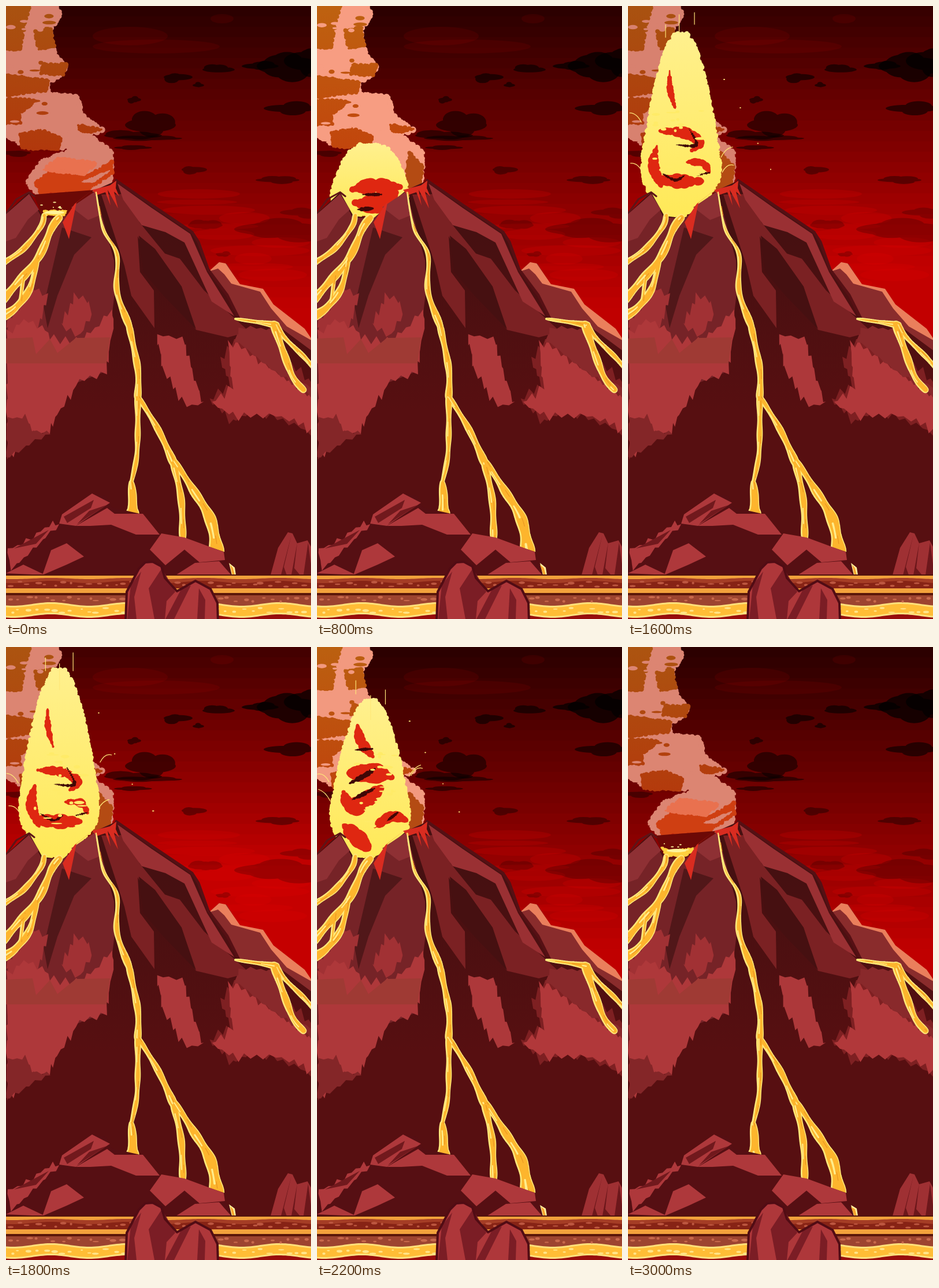
These frames come from a looping animation (528x1060 px, 3.2 s). An HTML page with a canvas:

```html
<!DOCTYPE html>
<html lang="en">
<head>
<meta charset="utf-8">
<title>Volcano</title>
<style>
html,body{margin:0;width:100%;height:100%;overflow:hidden;background:#2c0000}
canvas{display:block}
</style>
</head>
<body>
<canvas id="stage" width="528" height="1060"></canvas>
<script>
const c = document.getElementById('stage').getContext('2d');
const LIP = 362, { sin, cos, min, max, hypot, ceil, round } = Math;

function random(seed) {
  seed = seed * 48271 % 2147483647;
  return () => (seed = seed * 16807 % 2147483647) / 2147483647;
}
const mix = (a, b, k) => a + (b - a) * k;
const points = s => s.match(/\S+ \S+/g).map(p => p.split(' ').map(Number));

function poly(color, ...shapes) {
  c.fillStyle = color;
  for (const s of shapes) c.fill(new Path2D(`M${s}Z`));
}
function line(color, width, path) {
  c.strokeStyle = color; c.lineWidth = width; c.lineJoin = c.lineCap = 'round';
  c.stroke(new Path2D('M' + path));
}
function oval(color, x, y, rx, ry) {
  c.fillStyle = color;
  c.beginPath(); c.ellipse(x, y, rx, ry, 0, 0, 7); c.fill();
}
// splits each edge into steps of about the given length
function split(shape, step) {
  const p = points(shape);
  return p.flatMap(([x, y], i) => {
    const [x2, y2] = p[(i + 1) % p.length], k = max(1, ceil(hypot(x2 - x, y2 - y) / step));
    return Array.from({ length: k }, (_, s) => [mix(x, x2, s / k), mix(y, y2, s / k)]);
  });
}
// polygon with torn, spiky edges
function crag(color, shape, amp = 9) {
  const rnd = random(shape.length * 31);
  poly(color, split(shape, 11).map(([x, y], i) => [x + rnd() * 4, y + (i % 2 ? amp : -amp) * rnd()]).join(' '));
}
// polygon with a billowing rim
function puff(color, shape, r, seed) {
  const rnd = random(seed);
  poly(color, shape);
  c.beginPath();
  for (const [x, y] of split(shape, r)) {
    const q = r * (.35 + rnd() * .8);
    c.moveTo(x + q, y); c.arc(x, y, q, 0, 7);
  }
  c.fill();
}
// Catmull-Rom curve sampled at each pixel
function spline(s) {
  const p = points(s), at = i => p[max(0, min(p.length - 1, i))], out = [];
  for (let i = 0; i < p.length - 1; i++) {
    const m = ceil(hypot(at(i + 1)[0] - at(i)[0], at(i + 1)[1] - at(i)[1]));
    for (let n = 0; n < m; n++) {
      const t = n / m;
      out.push([0, 1].map(k => {
        const a = at(i - 1)[k], b = at(i)[k], d = at(i + 1)[k], e = at(i + 2)[k];
        return b + .5 * t * (d - a + t * (2 * a - 5 * b + 4 * d - e + t * (3 * (b - d) + e - a)));
      }));
    }
  }
  return out;
}
function ribbon(color, curve, width, dx = 0) {
  c.fillStyle = color;
  c.beginPath();
  curve.forEach(([x, y], i) => {
    const r = max(0, width(i, i / curve.length) / 2);
    if (r) { c.moveTo(x + dx + r, y); c.arc(x + dx, y, r, 0, 7); }
  });
  c.fill();
}

function cloud(alpha, x, y, w, h) {
  const rnd = random(x + y), color = `rgba(0,0,0,${alpha})`;
  c.fillStyle = color;
  c.beginPath();
  for (let i = 0; i < 4; i++) {
    const dx = i ? (rnd() - .5) * w : 0, dy = i ? (rnd() - .5) * h : 0, rx = i ? w * .5 : w;
    c.moveTo(x + dx + rx, y + dy);
    c.ellipse(x + dx, y + dy, rx, i ? h * .75 : h * .6, 0, 0, 7);
  }
  c.fill();
}

function sky(step) {
  const k = { 8: .45, 9: 1, 10: .5 }[step] || 0, rnd = random(8);
  for (let y = 0; y < 620; y += 18) {
    const red = min(mix(192, 197, k), mix(44 + y * .29, 68 + y * .345, k));
    c.fillStyle = `rgb(${round(red)},0,0)`;
    c.fillRect(0, y, 528, 19);
  }
  const haze = 'rgba(255,0,0,.07)';
  oval(haze, 215, 52, 65, 16); oval(haze, 260, 70, 110, 12); oval(haze, 374, 22, 20, 8);
  for (let y = 325; y < 490; y += 14) oval('rgba(225,0,0,.2)', 330 + rnd() * 170, y, 30 + rnd() * 60, 4 + rnd() * 7);
  cloud(.7, 492, 104, 58, 26); cloud(.7, 516, 95, 35, 26); cloud(.7, 440, 104, 32, 8);
  cloud(.58, 298, 123, 25, 9); cloud(.58, 368, 110, 28, 8); cloud(.58, 333, 137, 10, 5);
  cloud(.58, 492, 177, 46, 11); cloud(.5, 222, 162, 12, 6);
  cloud(.5, 250, 206, 44, 20); cloud(.5, 220, 224, 50, 9); cloud(.5, 245, 229, 60, 5); cloud(.5, 220, 245, 33, 4);
  cloud(.38, 326, 283, 22, 8); cloud(.38, 470, 301, 38, 6); cloud(.38, 15, 254, 28, 6);
  cloud(.2, 345, 379, 30, 10); cloud(.2, 475, 386, 80, 19); cloud(.2, 376, 429, 13, 4); cloud(.2, 510, 357, 36, 9);
}

const BROWN = ['-12 -10 42 -9 30 38 24 72 -12 75', '50 43 76 40 82 68 56 74', '62 101 103 102 98 119 60 117',
  '-12 120 74 131 68 148 -12 156', '-12 160 52 165 22 187 26 203 -12 203', '126 206 166 213 130 220', '25 221 60 213 95 228 90 246 28 244'];

function smoke(step) {
  const k = .6 - .4 * cos(step * Math.PI / 4), a = step % 8 * Math.PI / 4, rnd = random(77);
  const pink = `rgb(${round(mix(208, 247, k))},${round(mix(122, 157, k))},${round(mix(106, 130, k))})`;
  const brown = c.createLinearGradient(0, 0, 0, 260);
  brown.addColorStop(0, `rgb(${round(mix(164, 190, k))},${round(mix(78, 98, k))},16)`);
  brown.addColorStop(1, `rgb(${round(mix(174, 194, k))},${round(mix(52, 68, k))},12)`);
  puff(pink, '-12 -10 82 -10 95 14 76 42 84 85 103 105 98 118 73 132 74 150 125 158 130 188 166 214 98 246 22 238 -12 213', 5, 11);
  BROWN.forEach((s, i) => {
    c.save();
    c.translate(sin(a + i), 1.5 * cos(a + i));
    puff(brown, s, 4, 30 + i);
    c.restore();
  });
  for (let i = 0; i < 26; i++) {
    oval(i % 3 ? brown : pink, rnd() * 75, rnd() * 225 + 2 * sin(a + i), 3 + rnd() * 9, 1 + rnd() * 3);
  }
  puff(pink, '100 215 148 226 184 254 180 312 60 330 36 307 62 267 110 252', 5, 5);
  if (step > 2 && step < 14) return puff('#b44b13', '160 254 183 278 176 314 152 320', 4, 15);
  puff('#cf3f12', '52 306 84 280 135 298 183 270 184 288 125 330 104 350 70 350', 4, 15);
  puff('#e9714f', '65 283 90 264 156 272 134 290', 4, 24);
  puff('#b9230d', '72 326 121 324 100 341 73 338', 3, 12);
  puff(pink, '132 304 179 285 151 304', 2, 35);
}

// each vein: width, then its course
const DOME = { top: 238, red: [[22, '58 318 95 311 145 313'], [26, '64 340 100 342 138 322']],
  dark: [[5, '78 326 112 326'], [6, '70 352 98 350']] };
const BURST = { top: 168,
  red: [[8, '75 261 124 263'], [15, '52 312 68 322 92 325'], [21, '88 281 140 283 146 306'], [16, '78 338 110 325 130 308']],
  dark: [[10, '82 323 104 318 119 306'], [11, '113 300 128 282 142 300'], [6, '94 287 118 281']] };
const PLUME = { top: 42,
  red: [[9, '72 112 73 145 82 178'], [16, '55 216 100 220 125 237 110 250'], [15, '50 242 44 275 58 313'],
    [12, '102 270 130 272 142 290'], [20, '50 300 90 303 130 303']],
  dark: [[5, '84 240 118 240 105 211'], [5, '60 290 82 301 98 293'], [4, '120 293 141 288']] };
const ROLL = { top: 88,
  red: [[15, '70 135 76 163 97 190'], [27, '55 218 107 219 131 226'], [24, '46 251 62 278 112 243'],
    [24, '46 308 66 326 90 350'], [18, '100 311 129 293 156 300']],
  dark: [[8, '56 236 83 222 101 210'], [6, '61 264 101 244'], [5, '121 301 140 286'], [5, '66 178 97 176']] };
const POSES = [, , , DOME, DOME, BURST, BURST, PLUME, PLUME, PLUME, ROLL, ROLL, ROLL, ROLL];
const TOPS = [, , , 283, 238, 207, 168, 90, 42, 35, 55, 88, 155, 235];

function flame(step) {
  poly('#6c0906', '48 326 153 318 99 368 63 365');
  const pose = POSES[step], top = TOPS[step], rnd = random(step + 60);
  if (!pose) {
    const last = step === 15;
    puff('#ffcf3f', last ? '58 347 75 353 117 348 101 360 68 361' : '66 355 105 354 100 361 68 361', 2.5, step + 2);
    oval('#fff39a', 84, last ? 352 : 357, 17, 3);
    for (let i = 0; i < 6; i++) oval('#fff39a', 60 + rnd() * 50, 338 + rnd() * 14, 1 + rnd() * 2, 1);
    return;
  }
  const tall = LIP - top, power = tall > 220 ? .5 : .35, left = [], right = [];
  for (let i = 0; i <= 16; i++) {
    const u = .015 + i / 16 * .985, y = top + u * tall, x = 92 - 73 * max(0, u - .85);
    const w = 67 * min(1, (u / .7) ** power) - 49 * (max(0, u - .78) / .22) ** 1.6;
    left.unshift(`${x - w} ${y}`);
    right.push(`${x + w} ${y}`);
  }
  const yellow = c.createLinearGradient(0, top, 0, LIP);
  yellow.addColorStop(0, '#fff08e'); yellow.addColorStop(1, '#ffe958');
  puff(yellow, right.concat(left).join(' '), 4, step + 20);
  const scale = tall / (LIP - pose.top);
  const veins = (color, list) => list.forEach(([w, s]) => {
    const curve = spline(s).filter((_, i) => i % 3 < 1).map(([x, y]) => [x, LIP - (LIP - y) * scale]);
    ribbon(color, curve, (i, t) => w * (.25 + .8 * sin(t * Math.PI)) * (.7 + .65 * rnd()));
  });
  veins('#df2711', pose.red);
  veins('#400706', pose.dark);
  if (tall > 220) {
    for (let i = 0; i < 24; i++) oval('#ffeb68', 45 + rnd() * 90, max(top + 80, 180) + rnd() * 130, 2 + rnd() * 9, 1 + rnd() * 2);
  }
}

function sparks(step) {
  if (step < 5 || step > 12) return;
  const rnd = random(step * 17), top = TOPS[step], gold = '#ffe779';
  for (let i = 0; i < 3; i++) {
    const x = 62 + i * 26 + rnd() * 8, y = max(5, top - 35 + rnd() * 40);
    line(gold, 1.2, `${x} ${y}v${18 + rnd() * 28}`);
  }
  for (const side of [-1, 1, -1, 1]) {
    const x = 92 + side * (66 + rnd() * 6), y = 195 + rnd() * 100;
    line(gold, 1.2, `${x} ${y}q${side * 8} -16 ${side * 20} ${-20 + rnd() * 8}`);
  }
  for (let i = 0; i < 4; i++) oval(gold, 155 + i * 30 + rnd() * 12, 110 + i * 55 + rnd() * 20, 1 + rnd(), 1);
}

// start width, end width, course
const STREAMS = [
  [9, 11, '66 362 60 382 30 420 -6 445'], [13, 15, '92 366 79 384 56 435 15 484 -6 508'],
  [9, 16, '54 435 42 487 17 521 -6 537'], [6, 8, '31 460 25 510'],
  [2, 13, '156 322 168 385 192 430 192 493 213 553'], [11, 12, '213 553 228 628 228 676'],
  [11, 8, '228 676 228 732 226 780 217 824'], [9, 23, '217 824 219 850 219 878'],
  [8, 14, '229 676 263 732 290 790'], [12, 12, '290 790 303 852 306 921'],
  [9, 24, '292 787 322 834 353 886 365 943'],
  [4, 12, '397 541 445 548 468 552'], [14, 11, '464 551 480 598 497 642 515 664'], [8, 9, '469 551 482 573 517 608 534 628']
].map(([from, to, s]) => ({ from, to, curve: spline(s) }));

function lava(step) {
  const a = step % 8 * Math.PI / 4;
  const width = s => (i, t) => mix(s.from, s.to, t) * (1 + .13 * sin(i * .12));
  for (const s of STREAMS) ribbon('#ffe879', s.curve, width(s));
  for (const s of STREAMS) ribbon('#fdb52d', s.curve, (i, t) => width(s)(i, t) - 4.2, .6);
  STREAMS.forEach((s, n) => {
    ribbon('#e99420', s.curve, i => sin(i * .11 - a + n) > .72 ? 1.4 : 0, 2);
    ribbon('#ffed8c', s.curve, (i, t) => sin(i * .095 - a + n * 2) > .45 ? width(s)(i, t) * .18 : 0, -1.5);
  });
}

function volcano() {
  poly('#8a2c2c', '351 459 369 443 382 446 404 482 445 491 461 519 540 586 540 640 390 570');
  poly('#ea7f5c', '351 459 369 443 380 445 405 481 445 489 463 516 517 558 532 580 486 554 459 523 440 494 390 480 378 464 367 454');
  const body = c.createLinearGradient(0, 400, 0, 700);
  body.addColorStop(0, '#461011'); body.addColorStop(1, '#570f11');
  const slope = '191 302 252 344 322 391 333 408 350 456 383 500 404 542';
  poly(body, `0 359 40 322 63 363 98 367 155 318 ${slope} 460 545 540 604 540 985 0 985`);
  line('#561014', 5, slope);
  line('#5d1518', 3, '0 359 18 334 40 322 49 329');

  poly('#762327', '0 360 40 325 62 366 98 367 155 320 187 440 188 497 172 632 0 700');
  poly('#8e3034', '0 360 40 325 57 352 38 369 17 401 0 407', '113 348 155 320 165 361 142 370');
  poly('#511719', '97 383 148 400 118 430 89 501 72 557 65 519');
  crag('#a13134', '117 500 140 505 147 536 128 568 94 554');
  crag('#a13134', '0 544 48 485 70 505 52 568 0 602');
  crag('#ae383a', '0 566 38 540 66 560 73 576 130 578 181 528 186 542 172 633 125 648 86 705 72 736 36 744 13 776 0 781');
  crag('#842628', '0 714 33 709 42 735 76 737 13 774 0 780', 4);
  poly('#9f3a34', '76 576 89 600 121 574 180 573 174 618 0 618 0 575 46 573 52 602');

  poly('#7b2123', '165 326 213 325 231 374 275 428 301 437 343 492 421 563 384 573 329 560 264 470 228 398 232 460 256 492 257 557 217 501 205 449');
  poly('#9a3033', '193 307 252 349 319 394 348 460 395 536 356 511 309 409 276 391 235 379 203 335');
  poly('#461011', '230 397 258 420 304 485 313 512 329 559 272 500 238 460');
  crag('#ad383a', '260 568 303 572 315 613 341 688 310 692 269 630');
  crag('#7e2022', '369 613 400 570 451 573 528 655 528 738 428 697 391 722 350 681 386 654');
  crag('#b1383a', '382 584 406 587 451 625 528 674 528 739 487 710 400 709 356 688 390 660');
  crag('#89292b', '402 557 460 557 491 641 528 660 528 676 449 620 394 578', 4);

  // molten drips along the rim
  poly('#d92c20', '149 318 180 310 191 302 190 315 196 329 187 321 194 350 176 318 181 345 172 322 157 327',
    '155 314 122 340 109 403 98 374 119 342');
}

function foreground(step) {
  const light = '#ae383b';
  poly('#560f13', '0 944 92 895 98 879 149 843 173 847 183 867 232 878 269 916 301 918 378 944 381 961 398 984 0 984');
  crag(light, '0 941 43 920 78 892 91 897 45 940 8 974', 4);
  poly(light, '92 895 97 879 149 843 180 859 150 879 121 899', '121 899 175 868 188 878 237 878 266 914 225 914 182 897 146 899',
    '249 940 269 912 309 919 377 944 379 958 335 962 309 940 276 967', '78 941 105 929 135 952 105 966 63 984',
    '0 981 30 966 68 984', '294 984 327 963 369 960 390 984');
  poly('#71191d', '100 883 152 854 147 868 106 894', '123 896 144 873 174 863', '14 938 74 906 52 930');
  poly('#9f3033', '458 984 471 937 488 910 496 912 504 929 522 924 528 935 528 984');
  poly('#6c171b', '494 915 481 970 486 984 476 984', '504 929 499 972 509 984 494 984', '523 928 528 966 528 984 515 984');
  const grow = 963 + step % 4 * .7, edge = step % 8 > 3 ? 386 : 388;
  poly('#fff0a0', `386 ${grow} 396 971 398 984 391 984`);
  poly('#f7a52d', `${edge} ${grow + 3} 393 972 396 984 392 984`);
}

function strata() {
  const band = (y, color, amp = 0) => {
    c.fillStyle = color;
    c.beginPath(); c.moveTo(0, 1060);
    for (let x = 0; x <= 528; x += 4) c.lineTo(x, y + amp * sin(x / 21 + 1));
    c.lineTo(528, 1060); c.fill();
  };
  band(983, '#51130d'); band(985, '#f1a13b'); band(990, '#a53d25', 1); band(996, '#872315', 2);
  band(1007, '#f3a23c'); band(1015, '#5b1709'); band(1019, '#9d4430');
  band(1034, '#ffe07a', 3); band(1037, '#ffbd36', 3); band(1052, '#ffe27f', 3); band(1055, '#970e0d', 3);
  const rnd = random(41);
  const pebble = (color, x, y, tall) => oval(color, x + rnd() * 8, y + rnd() * tall, 2 + rnd() * 4, 1 + rnd() * 1.5);
  for (let x = 4; x < 528; x += 15) {
    pebble('#bd5740', x, 995, 9); pebble('#c8694c', x, 1022, 8); pebble('#ffe58a', x, 1040, 9);
  }
  const rock = '207 1064 209 1013 230 973 241 962 254 961 269 969 275 989 296 1012 328 994 354 1008 366 1032 367 1064';
  poly('#ae373a', rock);
  poly('#7b1d25', '270 972 293 1013 278 1029 275 1060 257 1060 247 1007', '216 1001 234 978 222 1022 226 1060 210 1060',
    '304 1007 320 1002 291 1060 276 1060', '334 1007 345 1027 344 1060 331 1060');
  line('#510c14', 4, rock);
}

let shown = -1;
function tick() {
  const step = Math.floor(performance.now() / 200) % 16;
  if (step !== shown) {
    shown = step;
    sky(step); smoke(step); flame(step); volcano(); lava(step); sparks(step); foreground(step); strata();
  }
  requestAnimationFrame(tick);
}
tick();
</script>
</body>
</html>
```
